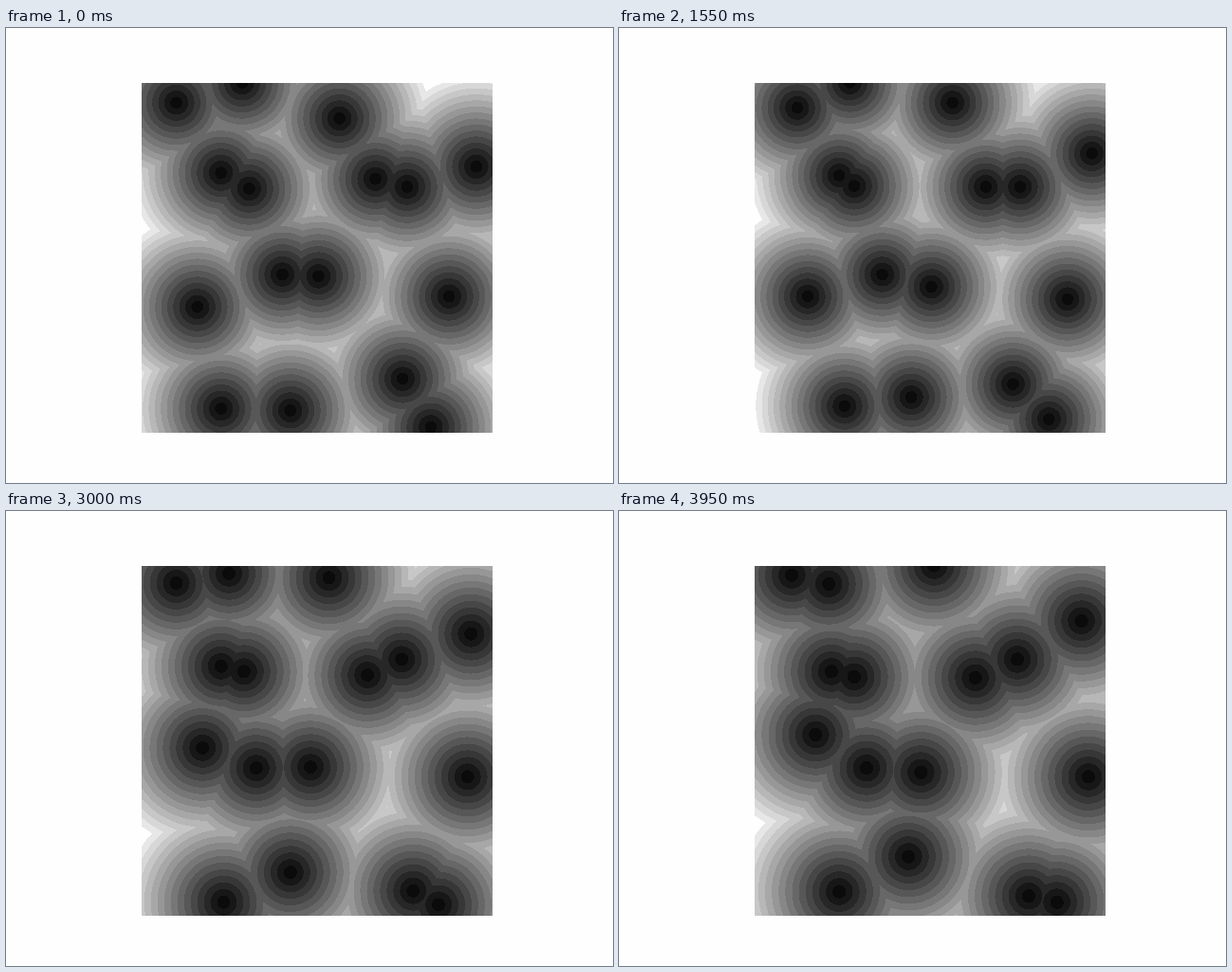
Recreate the animation shown at these times as a matplotlib script. Size 640x480 px, loop 4 s.

```python
import matplotlib.pyplot as plt
import numpy as np
from matplotlib.animation import FuncAnimation
from matplotlib.colors import ListedColormap

SIZE = 400          # cells along one side of the field
STEP = 3            # cells a walker moves along one axis per tick
FRAMES, INTERVAL = 80, 50
PULL = 0.15         # how strongly a walker is drawn to its course
PAPER = 254

# each walker's first and last cell
START = np.array([
    (39, 23), (114, 0), (225, 41), (90, 103), (122, 121), (266, 110),
    (302, 119), (381, 96), (160, 219), (201, 221), (63, 256), (350, 244),
    (90, 372), (169, 374), (297, 338), (329, 393)])
FINISH = np.array([
    (42, 12), (84, 21), (205, 0), (87, 121), (113, 127), (251, 128),
    (299, 107), (372, 63), (127, 231), (189, 236), (69, 193), (379, 239),
    (96, 372), (175, 326), (312, 378), (345, 385)])


def walk(rng):
    """Random steps of -1, 0 or 1 per axis, loosely following START to FINISH."""
    pos = START
    poses = [pos]
    for tick in range(1, FRAMES):
        left = FRAMES - 1 - tick
        course = START + (FINISH - START) * tick / (FRAMES - 1)
        pull = max(PULL, 1 / (left + 1))
        spread = min(1.5, left / 4)
        lean = pull * (course - pos) / STEP
        move = np.rint(lean + rng.uniform(-spread, spread, pos.shape))
        pos = np.clip(pos + STEP * np.clip(move, -1, 1), 0, SIZE - 1)
        poses.append(pos)
    return poses


poses = walk(np.random.default_rng(4))
cells = np.arange(SIZE)


def field(tick):
    """Distance from each cell to the nearest walker."""
    near = np.full((SIZE, SIZE), np.inf)
    for x, y in poses[tick]:
        np.minimum(near, (cells - x) ** 2 + (cells[:, None] - y) ** 2, out=near)
    return np.sqrt(near)


# sixteen even grey bands, the last one as light as the paper
greys = [11] + [16 * k + 7 for k in range(1, 15)] + [PAPER]
bands = ListedColormap([(g / 255,) * 3 for g in greys])

fig, ax = plt.subplots(figsize=(6.4, 4.8), dpi=100,
                       facecolor=(PAPER / 255,) * 3)
fig.subplots_adjust(left=0.125, right=0.9, bottom=0.11, top=0.88)
ax.axis("off")
image = ax.imshow(field(0), cmap=bands, vmin=0)


def update(tick):
    dist = field(tick)
    image.set_data(dist)
    image.set_clim(0, dist.max())
    return [image]


anim = FuncAnimation(fig, update, frames=FRAMES, interval=INTERVAL,
                     repeat=True, repeat_delay=0)
plt.show()
```
